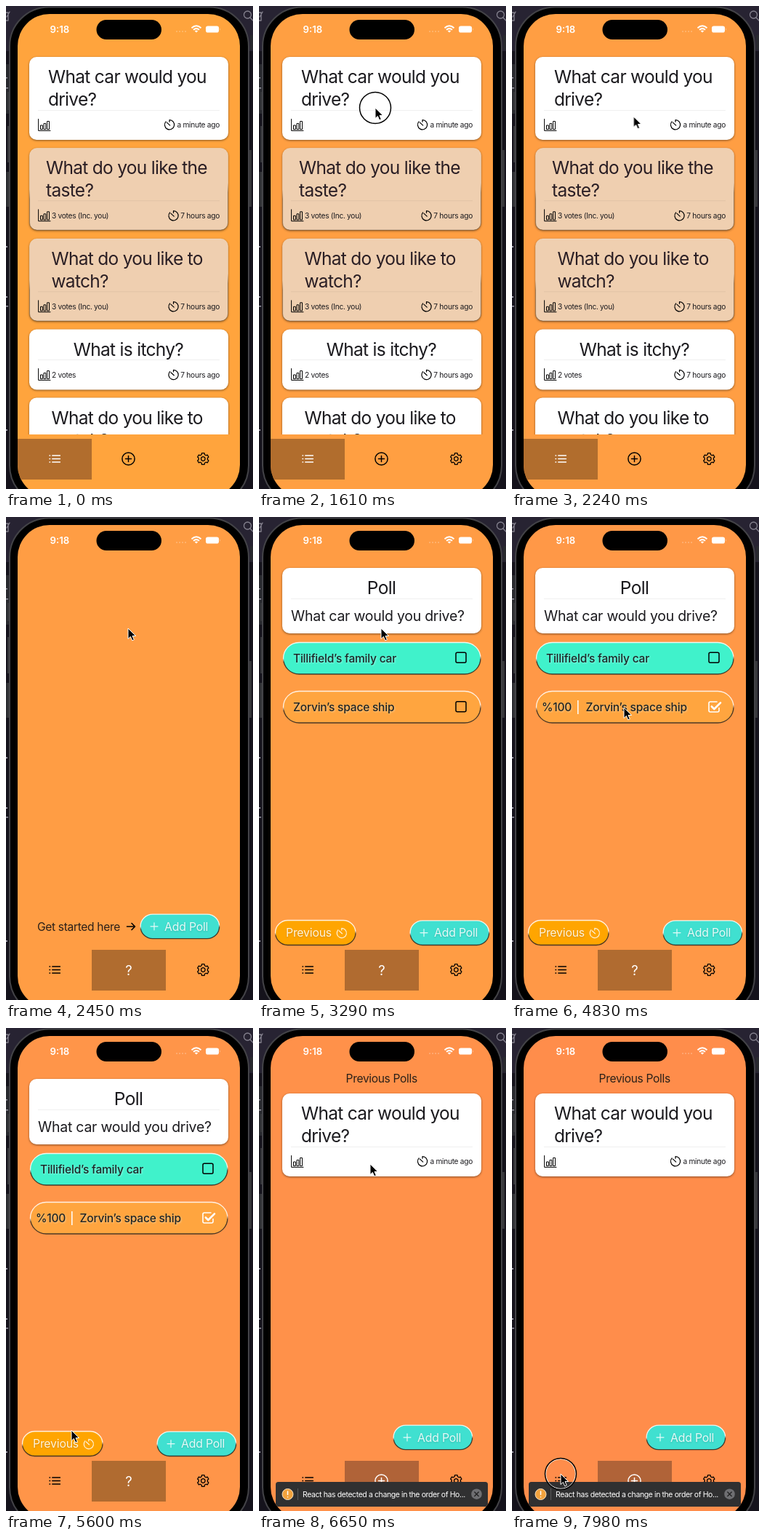
Write an HTML page that moves like this. It is 340 px wide and 664 px high and loops after 8000 ms.

```html
<!DOCTYPE html>
<html lang="en">
<head>
<meta charset="utf-8">
<title>Poll app</title>
<style>
html, body { margin: 0; width: 100%; height: 100%; overflow: hidden; background: #15131c; }
svg.stage { display: block; width: 340px; height: 664px; }

text { font-family: Inter, "Liberation Sans", sans-serif; font-optical-sizing: none; fill: #1b1a1e; }
.big { font-size: 24.5px; letter-spacing: -.7px; }
.mid { font-size: 19.5px; letter-spacing: -.25px; }
.body { font-size: 15.6px; letter-spacing: -.35px; fill: #2b2019; }
.label { font-size: 15.8px; letter-spacing: -.2px; fill: #fffd; filter: drop-shadow(.5px 1px 1px #0003); }
.option { font-size: 15.6px; letter-spacing: -.25px; font-weight: 500; fill: #1d2526; filter: drop-shadow(1px 1px 1px #fff6); }
.small { font-size: 10.2px; letter-spacing: -.3px; }
.end { text-anchor: end; }
.center { text-anchor: middle; }

.line { fill: none; stroke: currentColor; stroke-linecap: round; stroke-linejoin: round; }
.rule { stroke: #00000010; }
.card { filter: drop-shadow(.5px 1.5px 1.5px #0007); fill: #fff; }
.seen { fill: #efcfb0; stroke: url(#bevel); stroke-opacity: .4; }
.seen ~ .big { fill: #2a1e24; }
.pill { stroke: url(#bevel); stroke-width: 1.3; }
.white { color: #fff; }
.soft { color: #fffd; }

/* Timeline: 8 s loop */
.bg, .list, .start, .poll, .prev, .fresh, .pressed, .voted, .cursor, .ring {
  animation: 8s infinite step-end;
}
.bg { animation-name: bg; animation-timing-function: linear; }
.list { animation-name: list; }
.start { animation-name: start; }
.poll { animation-name: poll; }
.prev { animation-name: prev; }
.fresh { animation-name: fresh; }
.pressed { animation-name: pressed; }
.voted { animation-name: voted; }
.ring { animation-name: ring; }
.cursor { animation-name: cursor; animation-timing-function: ease-in-out; }

@keyframes bg {
  0% { fill: #ffa43d; }
  30.6% { fill: #ff9d44; }
  52.5% { fill: #ff9a45; }
  70% { fill: #ff9549; }
  100% { fill: #ff8d4b; }
}
@keyframes list { 0% { visibility: visible; } 30.625%, 100% { visibility: hidden; } }
@keyframes start { 0% { visibility: hidden; } 30.625% { visibility: visible; } 33.25%, 100% { visibility: hidden; } }
@keyframes poll { 0% { opacity: 0; } 33.25% { opacity: 1; } 77.875%, 100% { opacity: 0; } }
@keyframes prev { 0% { visibility: hidden; } 77.875%, 100% { visibility: visible; } }
@keyframes fresh { 0% { opacity: 1; } 51.6% { opacity: 0; } 54.25% { opacity: 1; } 56%, 100% { opacity: 0; } }
@keyframes pressed { 0% { opacity: 0; } 51.6% { opacity: 1; } 54.25%, 100% { opacity: 0; } }
@keyframes voted { 0% { opacity: 0; } 56%, 100% { opacity: 1; } }
@keyframes ring {
  0% { opacity: 0; }
  19.25% { opacity: 1; } 22.75% { opacity: 0; }
  51.6% { opacity: 1; } 54.25% { opacity: 0; }
  73.5% { opacity: 1; } 76.1% { opacity: 0; }
  98%, 100% { opacity: 1; }
}
@keyframes cursor {
  0%, 15.75% { transform: translate(300px, -30px); }
  19.25%, 24.5% { transform: translate(160px, 140px); }
  28.875%, 48.125% { transform: translate(168px, 153px); }
  51.6%, 66.5% { transform: translate(154px, 262px); }
  70% { transform: translate(90px, 553px); }
  72%, 77.875% { transform: translate(84px, 571px); }
  83.125%, 87.5% { transform: translate(153px, 187px); }
  93.6%, 100% { transform: translate(67px, 613px); }
}
</style>
</head>
<body>
<svg class="stage" viewBox="0 0 340 664">
  <defs>
    <clipPath id="screen"><rect x="16" y="11" width="306" height="664" rx="44"/></clipPath>
    <clipPath id="scroll"><rect x="16" y="46" width="306" height="543"/></clipPath>
    <clipPath id="pill2"><rect x="33.5" y="239.5" width="271.5" height="43.5" rx="21.7"/></clipPath>
    <linearGradient id="bevel" x1="0" y1="0" x2=".08" y2="1">
      <stop offset=".5" stop-color="#fff" stop-opacity=".85"/>
      <stop offset=".62" stop-color="#2a2620" stop-opacity=".85"/>
    </linearGradient>

    <path id="bars" class="line" stroke-width="1" d="M.6 .5V16.4H17M3.5 14.2V9H6.3V14.2ZM8 14.2V6.5H10.8V14.2ZM12.6 14.2V3.5H15.5V14.2Z"/>
    <path id="timer" class="line" stroke-width="1.2" d="M0-6.6A6.6 6.6 0 1 1-4.9-4.4M0-6.6V-4M-3.6-3.2L.7 .8"/>
    <path id="menu" class="line" stroke-width="1.5" d="M-3.2-4.6H7.4M-3.2 0H7.4M-3.2 4.6H7.4M-7-4.6h.6M-7 0h.6M-7 4.6h.6"/>
    <g id="add" class="line" stroke-width="1.5"><circle r="8.6"/><path d="M-4 0H4M0-4V4"/></g>
    <g id="gear" class="line" stroke-width="1.3">
      <path d="M-1.7-7.8H1.7L2.1-5.8 4-4.7 5.9-5.4 7.6-2.5 6.1-1.1V1.1L7.6 2.5 5.9 5.4 4 4.7 2.1 5.8 1.7 7.8H-1.7L-2.1 5.8-4 4.7-5.9 5.4-7.6 2.5-6.1 1.1V-1.1L-7.6-2.5-5.9-5.4-4-4.7-2.1-5.8Z"/>
      <circle r="2.8"/>
    </g>
    <rect id="box" class="line" x="271" y="186.3" width="14" height="14" rx="2" stroke-width="1.5"/>

    <g id="addPoll">
      <rect class="pill" x=".6" y=".6" width="108.6" height="33.6" rx="16.8" fill="#40e0d0"/>
      <path class="line soft" stroke-width="1.2" d="M14.5 17.3H24.5M19.5 12.3V22.3"/>
      <text class="label" x="33.5" y="23">Add Poll</text>
    </g>

    <g id="carCard">
      <rect class="card" x="32" y="70" width="274" height="114" rx="10"/>
      <text class="big" x="58" y="106">What car would you</text>
      <text class="big" x="58" y="137">drive?</text>
      <path class="rule" d="M44 143.5H294"/>
      <use href="#bars" x="44" y="155"/>
      <use href="#timer" x="225" y="163.3"/>
      <text class="small end" x="294" y="167">a minute ago</text>
    </g>

    <g id="footer">
      <path class="rule" d="M44-20.5H294"/>
      <use href="#bars" x="44" y="-9"/>
      <use href="#timer" x="230.5" y="0"/>
      <text class="small end" x="294" y="3.7">7 hours ago</text>
    </g>
  </defs>

  <!-- Desktop behind the phone -->
  <rect width="340" height="664" fill="#15131c"/>
  <rect width="340" height="62" fill="#272332"/>
  <path fill="#292a2f" d="M0 80h4v68H0ZM0 228h4v48H0ZM336 40h4v20h-4Z"/>
  <path fill="#9a98a5" d="M0 98h2v1.5H0ZM0 112h3v1.5H0ZM0 330h2v2H0ZM0 399h2v2H0ZM0 412h3v1.5H0ZM0 582h2v2H0Z"/>
  <g class="line" color="#85828f" stroke-width="1.3">
    <circle cx="332.5" cy="12" r="5"/><path d="M336 16L341 21M0 9H3V20H0M1 15L5 8"/>
  </g>

  <!-- Phone body -->
  <path fill="#37383b" d="M2 118h4v25H2ZM2 165h4v50H2ZM2 228h4v48H2ZM333 198h5v78h-5Z"/>
  <rect x="5" y="1.5" width="329" height="684" rx="54" fill="#000" stroke="#434347" stroke-width="2"/>

  <g clip-path="url(#screen)">
    <rect class="bg" x="16" y="11" width="306" height="664"/>

    <!-- Status bar -->
    <rect x="124.5" y="19" width="89.5" height="27" rx="13.5"/>
    <text x="60.5" y="36.7" font-size="13.2" font-weight="600" style="fill:#fff">9:18</text>
    <path class="line white" stroke-width="1.6" opacity=".45" d="M235 35h.1M239 35h.1M243 35h.1M247 35h.1"/>
    <g class="line white" stroke-width="2" style="stroke-linecap:butt">
      <path d="M255.5 30.2Q262 24.4 268.5 30.2M258 32.8Q262 29.2 266 32.8"/>
      <path fill="#fff" stroke="none" d="M259.7 34.3Q262 32.5 264.3 34.3L262 36.6Z"/>
    </g>
    <rect x="275" y="27.5" width="18" height="9" rx="2.8" fill="#fff"/>
    <path d="M294.3 30.5q1.5 1.5 0 3Z" fill="#fff" opacity=".6"/>

    <!-- Poll list -->
    <g class="list">
      <g clip-path="url(#scroll)">
        <use href="#carCard"/>
        <g>
          <rect class="card seen" x="32.5" y="195.5" width="273" height="112.5" rx="10"/>
          <text class="big" x="55" y="231">What do you like the</text>
          <text class="big" x="55" y="262">taste?</text>
          <use href="#footer" y="288.3"/>
          <text class="small" x="63" y="292">3 votes (Inc. you)</text>
        </g>
        <g>
          <rect class="card seen" x="32.5" y="320" width="273" height="113" rx="10"/>
          <text class="big" x="62.5" y="356">What do you like to</text>
          <text class="big" x="62.5" y="387">watch?</text>
          <use href="#footer" y="413.3"/>
          <text class="small" x="63" y="417">3 votes (Inc. you)</text>
        </g>
        <rect class="card" x="32" y="444.5" width="274" height="83" rx="10"/>
        <text class="big center" x="168.5" y="480.5">What is itchy?</text>
        <use href="#footer" y="507"/>
        <text class="small" x="63" y="510.7">2 votes</text>

        <rect class="card" x="32" y="538.5" width="274" height="113" rx="10"/>
        <text class="big" x="62.5" y="574.5">What do you like to</text>
        <text class="big" x="62.5" y="605.5">watch?</text>
      </g>
      <rect x="16" y="595" width="102" height="56" fill="#b16d2d"/>
      <use href="#menu" class="white" x="67" y="622.5"/>
      <use href="#add" x="168.5" y="622.5"/>
      <use href="#gear" x="271.3" y="622.5"/>
    </g>

    <!-- Empty poll page -->
    <g class="start">
      <text class="body" x="43" y="568.7">Get started here</text>
      <path class="line" stroke-width="1.6" d="M166.500 563H177.500M173 558.500L177.500 563 173 567.500"/>
      <use href="#addPoll" x="184.5" y="545.5"/>
      <rect x="118" y="595" width="102" height="56" fill="#b06c2f"/>
      <use href="#menu" x="67" y="622.5"/>
      <text class="center" x="169" y="629.5" font-size="18.5" style="fill:#fff">?</text>
      <use href="#gear" x="271.3" y="622.5"/>
    </g>

    <!-- Poll with two options -->
    <g class="poll">
      <rect class="card" x="32" y="70" width="274" height="90" rx="10"/>
      <text class="big center" x="168.5" y="106">Poll</text>
      <path class="rule" d="M44 112.5H294"/>
      <text class="mid" x="44" y="143">What car would you drive?</text>

      <rect class="pill" x="33.5" y="172.5" width="271.5" height="43.5" rx="21.7" fill="#40f2cb"/>
      <text class="option" x="47" y="200">Tillifield’s family car</text>
      <use href="#box"/>

      <g class="fresh">
        <rect class="pill" x="33.5" y="239.5" width="271.5" height="43.5" rx="21.7" fill="#ffa53f"/>
        <text class="option" x="47" y="267">Zorvin’s space ship</text>
        <use href="#box" y="67.5"/>
      </g>
      <g class="pressed">
        <rect class="pill" x="33.5" y="239.5" width="271.5" height="43.5" rx="21.7" fill="#da9044" stroke-opacity=".4"/>
        <rect x="41" y="252" width="280" height="40" rx="8" fill="#c98237" clip-path="url(#pill2)"/>
        <text class="option" x="47" y="267" style="fill:#8b4f33;filter:none">Zorvin’s space ship</text>
        <use href="#box" y="67.5" color="#7d4b2a"/>
      </g>
      <g class="voted">
        <rect class="pill" x="33.5" y="239.5" width="271.5" height="43.5" rx="21.7" fill="#ffa53f"/>
        <text class="option" x="41" y="267">%100</text>
        <path d="M90.8 252V271" stroke="#fff" stroke-width="1.5"/>
        <text class="option" x="101.5" y="267">Zorvin’s space ship</text>
        <g class="line white">
          <path stroke-width="1.6" d="M285 262.5V266Q285 268 283 268H273Q271 268 271 266V256Q271 254 273 254H282"/>
          <path stroke-width="2.6" d="M274.800 260.500L278.300 264 287 255.300"/>
        </g>
      </g>

      <rect class="pill" x="22.5" y="554.5" width="110.5" height="34" rx="17" fill="#ffa500"/>
      <text class="label" x="37" y="577.3">Previous</text>
      <use href="#timer" class="soft" x="113.8" y="572"/>
      <use href="#addPoll" x="207.5" y="554.3"/>

      <rect x="118" y="595" width="102" height="56" fill="#b06b30"/>
      <use href="#menu" x="67" y="622.5"/>
      <text class="center" x="169" y="629.5" font-size="18.5" style="fill:#fff">?</text>
      <use href="#gear" x="271.3" y="622.5"/>
    </g>

    <!-- Previous polls -->
    <g class="prev">
      <text class="body center" x="168.7" y="75">Previous Polls</text>
      <use href="#carCard" y="20"/>
      <use href="#addPoll" x="184.5" y="545.5"/>
      <rect x="118" y="595" width="102" height="56" fill="#b06338"/>
      <use href="#menu" x="67" y="622.5"/>
      <use href="#add" class="white" x="168.5" y="622.5"/>
      <use href="#gear" x="271.3" y="622.5"/>

      <rect x="23" y="624" width="292" height="34" rx="3.5" fill="#303031"/>
      <circle cx="39.5" cy="641" r="7.5" fill="#f2a23c" stroke="#f8e3c4"/>
      <path class="line white" stroke-width="1.5" d="M39.5 637V641.5M39.5 644.7v.1"/>
      <path d="M53.5 633V649" stroke="#5a5a5c"/>
      <text x="60" y="644.5" font-size="10.5" letter-spacing="-.4" style="fill:#fff">React has detected a change in the order of Ho...</text>
      <circle cx="299.5" cy="640.7" r="7.3" fill="#6f6f72"/>
      <path class="line" color="#242425" stroke-width="1.4" d="M296.8 638L302.2 643.4M302.2 638L296.8 643.4"/>
    </g>
  </g>

  <!-- Pointer -->
  <g class="cursor">
    <g class="ring" fill="none">
      <circle r="20.4" stroke="#fff" stroke-width="1"/>
      <circle r="21.5" stroke="#000" stroke-width="1.5"/>
    </g>
    <path d="M0 0V14.5L3.4 11.4 5.7 16.8 8.3 15.7 6 10.5H10.6Z" stroke="#fff" stroke-width="1" stroke-linejoin="round"/>
  </g>
</svg>
</body>
</html>
```
